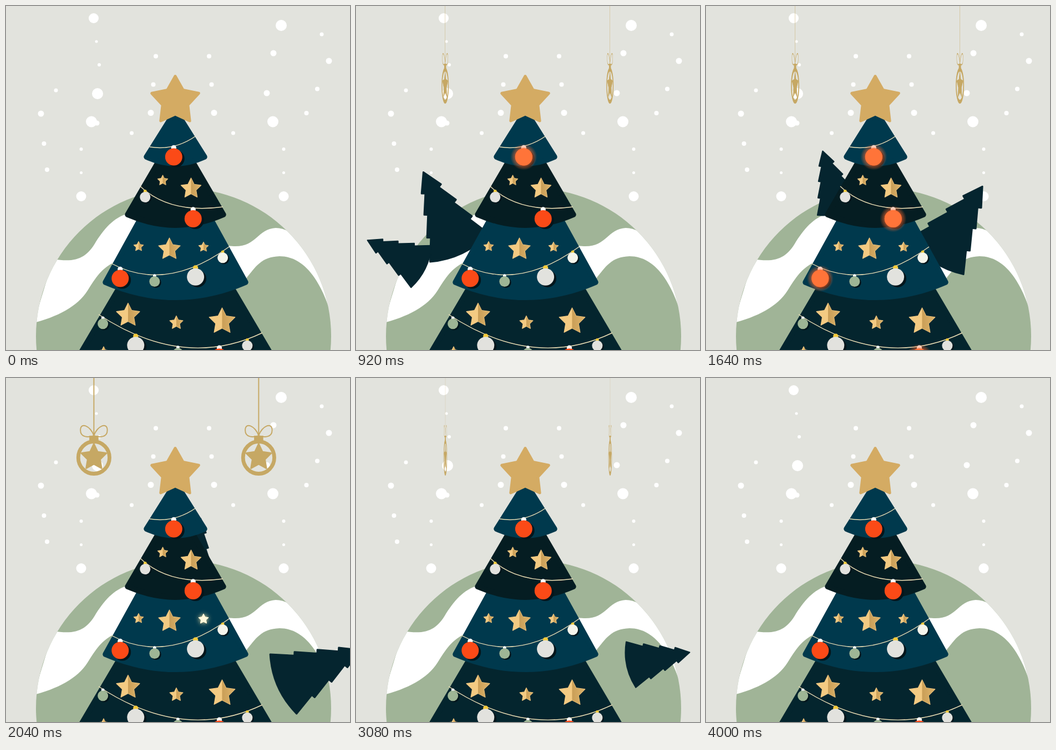
Write an HTML page that moves like this. It is 620 px wide and 620 px high and loops after 4280 ms.

```html
<!DOCTYPE html>
<html lang="en">
<head>
<meta charset="utf-8">
<title>Christmas tree</title>
<style>
  html, body { margin: 0; width: 100%; height: 100%; overflow: hidden; background: #e2e3dd; }
  svg { display: block; width: 100vw; height: 100vh; }
  .starlight { filter: drop-shadow(0 0 4px #ffe9a8); }
</style>
</head>
<body>
<svg id="stage" viewBox="0 0 620 620"></svg>
<script>
const LOOP = 4280, STEP = 40, LAST = 4000;
const MID = 305.5, GOLD = '#c6a864', BLUE = '#00394d', WHITE = '#fff';
const RED = '#fb4a17', GREY = '#e2e2de', GREEN = '#9eb595', CREAM = '#f5f5ec', YELLOW = '#f4ca3c';

// Top to bottom. Garland: start, control, end. Bauble: place along the garland, radius, colour, cap.
// Star: x, y, radius and, if it lights up, the time.
const tiers = [
  {
    apex: 179, half: 58, hem: 272, fill: BLUE,
    garland: [[259, 254], [303, 261], [341, 235]],
    baubles: [[.51, 15.5, RED, WHITE]],
    stars: []
  },
  {
    apex: 218, half: 92, hem: 376, fill: '#051d22',
    garland: [[242, 325], [295, 375], [391, 362]],
    baubles: [[.7, 15.5, RED, WHITE], [.08, 9.5, GREY, YELLOW]],
    stars: [[282.5, 314.5, 9.5], [333.5, 329, 19, 3440]]
  },
  {
    apex: 259, half: 132, hem: 498, fill: BLUE,
    garland: [[190, 464], [288, 517], [402, 434]],
    baubles: [[.08, 15.5, RED, WHITE], [.385, 9.5, GREEN, WHITE],
      [.73, 15.5, GREY, YELLOW], [.95, 9.5, CREAM, YELLOW]],
    stars: [[239, 433.5, 9], [294.5, 438.5, 20.5], [356, 434.5, 9, 2040]]
  },
  {
    apex: 326, half: 185, hem: 640, fill: '#04252e',
    garland: [[167, 556], [320, 657], [462, 589]],
    baubles: [[.73, 15.5, RED, WHITE], [.025, 9.5, GREEN, WHITE], [.22, 15.5, GREY, YELLOW],
      [.475, 9.5, GREEN, WHITE], [.905, 9.5, GREY, YELLOW]],
    stars: [[220, 557.5, 22], [307, 571, 12.5, 2640], [389.5, 568.5, 24.5], [176, 624, 10]]
  }
];

// Little trees circling behind the big one; angles in degrees
const orbits = [
  { x: 287, y: 646, r: 385, start: -10.8, speed: .0818, scale: 1 },
  { x: 298.6, y: 558, r: 310, start: -34.5, speed: .0658, scale: .715 }
];

const circle = (x, y, r, fill) => `<circle cx="${x}" cy="${y}" r="${r}" fill="${fill}"/>`;
const path = (d, fill, extra = '') => `<path d="${d}" fill="${fill}" ${extra}/>`;
const line = (color, width) => `stroke="${color}" stroke-width="${width}" stroke-linejoin="round"`;

// A run of flakes with a constant step between them
const strand = (x, y, dx, dy, ...radii) =>
  radii.map((r, i) => circle(x + i * dx, y + i * dy, r, WHITE)).join('');
const twin = (x, y, dx, ...rest) => strand(x, y, dx, ...rest) + strand(636 - x, y, -dx, ...rest);

const snow =
  twin(270, 90.5, -4.5, 51, 4, 4, 5.5) +
  twin(135.5, 258, 0, 42.5, 3, 2.5, 9) +
  twin(226.5, 229, 0, 0, 3.5) +
  strand(158, 22, 5, 42, 9, 2.5, 3) +
  strand(165, 158, -11, 50.5, 10, 10) +
  strand(164, 211, 0, 0, 4.5) +
  strand(90, 152, -27, 42, 3.5, 5.5) +
  strand(68.5, 248, 5.5, 47, 4, 4) +
  strand(496, 35, -14, 50, 10, 5.5) +
  strand(470, 157, 11, 51.5, 5.5, 10) +
  strand(569, 51, 13, 48, 3.5, 5.5) +
  strand(561, 149.5, -19.5, 43.5, 4, 4);

function starPath(x, y, r, inner = .5, points = 10) {
  let d = '';
  for (let i = 0; i < points; i++) {
    const a = i * Math.PI / 5, q = i % 2 ? r * inner : r;
    d += `${i ? 'L' : 'M'}${(x + q * Math.sin(a)).toFixed(2)} ${(y - q * Math.cos(a)).toFixed(2)}`;
  }
  return d + 'Z';
}

const goldStar = ([x, y, r]) =>
  path(starPath(x, y, r), '#f3ca82', line('#f3ca82', 1.2)) +
  path(starPath(x, y, r, .5, 6), 'url(#facet)');

// The rounded outline adds 5 around an inset cone
function cone({ apex, half, hem, fill }) {
  const w = half - 5.8;
  return path(`M${MID} ${apex + 10}L${MID - w} ${hem}Q${MID} ${hem + half * .41} ${MID + w} ${hem}Z`,
    fill, line(fill, 10));
}

const garland = ([a, b, c]) => path(`M${a}Q${b} ${c}`, 'none', line('#eedfb6', 1.4));

function hang([a, b, c], [t, r]) {
  const at = i => (1 - t) ** 2 * a[i] + 2 * t * (1 - t) * b[i] + t * t * c[i];
  return [at(0), at(1) + r * 1.25];
}

function bauble(curve, item) {
  const [x, y] = hang(curve, item), [, r, fill, cap] = item;
  return circle(x + r * .25, y + r * .2, r, '#02151b') + circle(x, y - r - 1, r * .3, cap) + circle(x, y, r, fill);
}

function ember({ garland, baubles }) {
  const [x, y] = hang(garland, baubles[0]);
  return `<g class="ember">${circle(x, y, 24, 'url(#halo)')}${circle(x, y, 15.5, '#ff7439')}</g>`;
}

const starlight = ([x, y, r]) =>
  path(starPath(x, y, r), '#fff8dc', `class="starlight" ${line('#fff8dc', 1.2)}`);

function littleTree() {
  const right = [], left = [];
  for (let i = 1; i <= 4; i++) {
    const h = 33 * i + 1.25 * i * i, w = 8 + h / 3;
    right.push(`${w} ${h}`);
    left.unshift(`${-w} ${h}`);
    if (i < 4) {
      right.push(`${w - 6} ${h + 3}`);
      left.unshift(`${6 - w} ${h + 3}`);
    }
  }
  return path(`M0 1L${right.join('L')}Q0 174 ${left.join('L')}Z`, '#05252f', line('#05252f', 3));
}

const loop = side => `M0 104C${6 * side} 86 ${25 * side} 79 ${25 * side} 94C${25 * side} 108 ${10 * side} 107 0 104`;
const ornament = `<g class="hanging"><g transform="translate(-3)">
  ${path('M0 0V105' + loop(-1) + loop(1), 'none', line(GOLD, 2))}
  <rect x="-8.5" y="104" width="17" height="9" fill="${GOLD}"/>
  <circle cy="143.5" r="29" fill="none" ${line(GOLD, 7)}/>
  ${path(starPath(0, 143, 24), GOLD, line(GOLD, 3))}
</g></g>`;

const allStars = tiers.flatMap(t => t.stars);
const litStars = allStars.filter(s => s[3]);

const stage = document.getElementById('stage');
stage.innerHTML = `
<defs>
  <clipPath id="globe"><circle cx="320" cy="595" r="266"/></clipPath>
  <linearGradient id="facet"><stop stop-color="#c99e57"/><stop offset="1" stop-color="#deb46b"/></linearGradient>
  <radialGradient id="halo">
    <stop offset=".55" stop-color="#ff6a30" stop-opacity=".7"/>
    <stop offset="1" stop-color="#ff6a30" stop-opacity="0"/>
  </radialGradient>
</defs>
<rect width="620" height="620" fill="#e2e3dd"/>
${circle(320, 595, 266, '#a0b497')}
<g clip-path="url(#globe)">
  ${path('M85 456C125 463 145 455 162 425C180 397 198 378 225 373L400 432C452 440 450 402 486 400' +
    'Q505 400 520 415L600 500L584 550C568 500 540 451 493 451C460 452 450 470 432 492L205 458' +
    'C175 468 163 488 150 508C133 538 100 558 50 571Z', WHITE)}
</g>
${snow}
${orbits.map(() => `<g class="orbit">${littleTree()}</g>`).join('')}
${[...tiers].reverse().map(cone).join('')}
${tiers.map(t => garland(t.garland)).join('')}
${path(starPath(305, 171, 44.5, .54), '#d4ab63', line('#d4ab63', 5))}
${allStars.map(goldStar).join('')}
${tiers.map(t => t.baubles.map(b => bauble(t.garland, b)).join('')).join('')}
${tiers.map(ember).join('')}
${litStars.map(starlight).join('')}
${ornament}${ornament}`;

const all = name => [...stage.querySelectorAll('.' + name)];
const orbitEls = all('orbit'), emberEls = all('ember'), starEls = all('starlight'), hangEls = all('hanging');

const clamp = v => Math.max(0, Math.min(1, v));
// Fades in from one time and out until another
const pulse = (t, from, to, fade) => clamp(Math.min(t - from, to - t) / fade);

function draw(t) {
  orbits.forEach((o, i) => {
    const turn = o.start + o.speed * t - 90;
    orbitEls[i].setAttribute('transform',
      `translate(${o.x} ${o.y}) rotate(${turn}) translate(0 ${-o.r}) scale(${o.scale})`);
  });
  emberEls.forEach((el, i) => el.setAttribute('opacity', pulse(t, 700 + 250 * i, 1900, 150)));
  starEls.forEach((el, i) => {
    const peak = litStars[i][3];
    el.setAttribute('opacity', pulse(t, peak - 280, peak + 280, 200));
  });
  const width = clamp(1 - Math.abs(t % 1505 - 520) / 500);
  hangEls.forEach((el, i) => {
    el.setAttribute('transform', `translate(${161.3 + 297 * i}) scale(${width} 1)`);
    el.setAttribute('visibility', width > .07 ? 'visible' : 'hidden');
  });
}

const begin = performance.now();
function tick() {
  const t = (performance.now() - begin) % LOOP;
  draw(Math.min(LAST, Math.floor(t / STEP) * STEP));
  requestAnimationFrame(tick);
}
tick();
</script>
</body>
</html>
```
